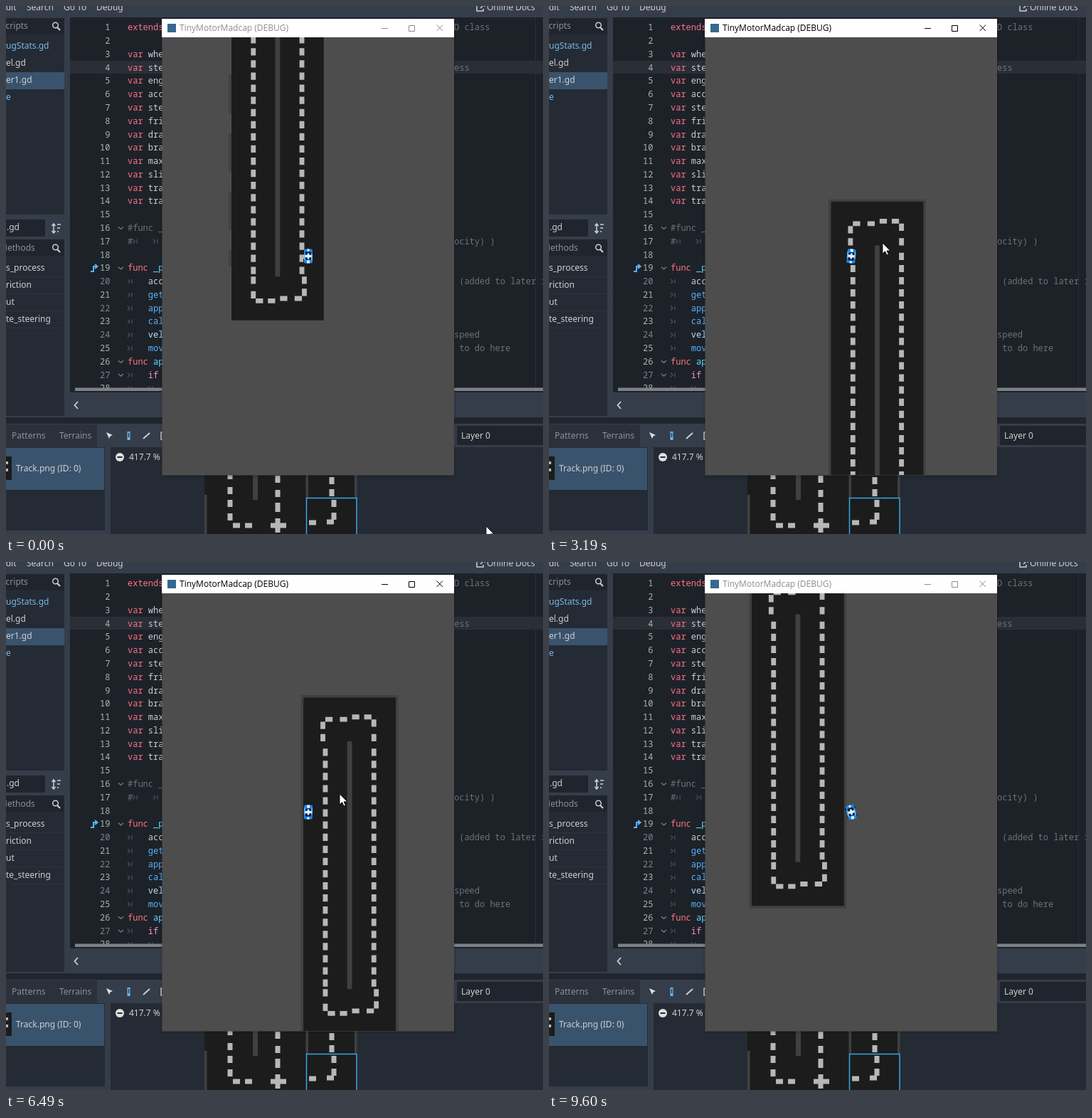
Write an HTML page that moves like this. It is 755 px wide and 742 px high and loops after 9680 ms.

```html
<!DOCTYPE html>
<html lang="en">
<head>
<meta charset="utf-8">
<title>Top-down racer</title>
<style>
  html, body { margin: 0; width: 100%; height: 100%; overflow: hidden; background: #363d4a; }
  svg { display: block; }
  text { white-space: pre; font: 12px "Noto Sans", "Open Sans", sans-serif; fill: #cdcfd2; }
  #code text { font-family: "Noto Sans Mono", "DejaVu Sans Mono", monospace; }
  #chrome text { font-family: "Open Sans", "Noto Sans", sans-serif; fill: inherit; stroke: none; }
  #chrome { fill: #000; stroke: #000; }
  #chrome.idle { fill: #8c8c8c; stroke: #8c8c8c; }
  #chrome path { fill: none; }
  #icons { fill: none; stroke: #cdcfd2; stroke-width: 1.5; }
  #icons .solid { fill: #e0e0e0; stroke: none; }
  .hint text, text.hint { fill: #8b9099; }
  .link { fill: #7ab8ea; }
  .panel { fill: #252b34; }
  .field { fill: #20252d; }
  .pick { fill: #3a536d; }
  .road { fill: #1c1c1c; }
  .kerb { fill: #404040; }
  .dash { fill: none; stroke: #b7b7b7; }
</style>
</head>
<body>
<svg width="755" height="742" viewBox="0 0 755 742">
  <defs>
    <clipPath id="view"><rect x="220" y="44" width="410" height="615"/></clipPath>
    <filter id="shade" x="-5%" y="-5%" width="110%" height="110%">
      <feDropShadow dx="0" dy="1" stdDeviation="2" flood-color="#000" flood-opacity=".3"/>
    </filter>
  </defs>

  <g id="panels">
    <path class="panel" d="M0 17H82V293H0ZM0 328H82V576H0ZM0 620H139V737H0ZM147 620H755V742H147Z"/>
    <path class="field" d="M0 17H82V40H0ZM0 300H55V324H0ZM0 328H82V351H0ZM634 590H755V617H634Z"/>
    <path class="pick" d="M0 93H82V117H0ZM0 621H138V680H0Z"/>
    <path fill="#1d2229" d="M90 16H755V543H90Z"/>
    <path fill="#2a2f37" d="M90 77H755V95H90ZM744 16h1V543h-1Z"/>
    <path fill="#21262e" d="M0 578H755V587H0Z"/>
    <path fill="#2b313b" d="M0 588H128V620H0Z"/>
    <path class="road" d="M0 633H8V666H0Z"/>
    <path class="dash" d="M1.500 640v20" stroke-width="3" stroke-dasharray="4 6"/>
    <path d="M0 380.500H82M0 404.500H82M0 428.500H82M0 452.500H82" stroke="#2d343e"/>
  </g>

  <g id="labels">
    <text x="-7" y="6">Edit</text><text x="29" y="6">Search</text><text x="81" y="6">Go To</text>
    <text x="127" y="6">Debug</text><text x="676" y="6">Online Docs</text>
    <text class="hint" x="-7" y="32">Scripts</text>
    <text class="link" x="0" y="60">ugStats.gd</text><text x="0" y="84">el.gd</text>
    <text x="0" y="108">er1.gd</text><text class="link" x="0" y="132">e</text>
    <text x="1" y="315">.gd</text><text class="hint" x="-9" y="344">Methods</text>
    <text x="0" y="372">s_process</text><text x="0" y="396">riction</text>
    <text x="0" y="420">ut</text><text x="0" y="444">te_steering</text>
    <text class="hint" x="8" y="608">Patterns</text><text class="hint" x="75" y="608">Terrains</text>
    <text x="640" y="608">Layer 0</text><text x="173" y="638">417.7 %</text>
    <text x="14" y="654">Track.png (ID: 0)</text>
  </g>

  <g id="code"></g>
  <path fill="#7d8187" d="M97 536.500H755V541H97Z"/>
  <path fill="#363d4a" d="M90 543H755V578H90Z"/>

  <g id="icons">
    <path d="M664-3H662V7H671V4M667 3L673-3M669-3H673V1"/>
    <g id="lens"><circle cx="69.500" cy="27" r="3.800"/><path d="M72 30L76 34" stroke-width="2.200"/></g>
    <use href="#lens" y="312"/>
    <path d="M67 307V318M64.500 309L67 306 69.500 309M64.500 316L67 319 69.500 316M72 307H77M72 312H76M72 317H74"/>
    <path d="M101 556L96.500 561 101 566" stroke-width="1.800"/>
    <path d="M119 373H123V366H127M125 363L128.500 366 125 369" stroke="#57b3ff" stroke-width="2"/>
    <path class="solid" d="M141 599L150 603 146.500 604.500 145 608Z"/>
    <path d="M172.500 598V610" stroke="#6cb6ef" stroke-width="4"/>
    <path d="M172.500 600V606" stroke="#2b3a4a"/>
    <path d="M193 608L202 600" stroke-width="2"/>
    <path d="M222 599H218V609H222"/>
    <circle class="solid" cx="160" cy="634" r="6"/>
    <path d="M156.500 634H163.500" stroke="#252b34" stroke-width="2"/>
  </g>

  <g id="tilemap">
    <path class="road" d="M279 659H493V742H279Z"/>
    <path class="kerb" d="M279 687h3.500V742h-3.500ZM347 659h7V694h-7ZM421.500 659h3.500V692h-3.500ZM490 659h3.500V691h-3.500Z"/>
    <path class="dash" stroke-width="7" d="M315 655v10m0 11v10m0 8v10m0 9v10M382 660v10m0 10v10m0 8v13
      M382 720v20M372 730h22M458 662v10m0 7v10M461 694v10m0 8v10M319 730h10m7 0h10M451 725h10M426 726h10"/>
    <path d="M422.500 745V691.500H493V745" fill="none" stroke="#35a7e8" stroke-width="1.500"/>
  </g>

  <g id="window">
    <path d="M219.500 18.500H630V659.500H219.500Z" fill="#4d4d4d" filter="url(#shade)"/>
    <path d="M219 18H630V44H219Z" fill="#fff"/>
    <rect x="227" y="25" width="12" height="12" fill="#35698f"/>
    <path id="hover" d="M591 18H630V44H591Z" fill="#e81123"/>
    <g id="chrome">
      <text x="244" y="35">TinyMotorMadcap (DEBUG)</text>
      <path d="M528 31.500H537M566.500 27.500H574.500V35.500H566.500ZM605.500 26.500L614 35M614 26.500L605.500 35"/>
    </g>
    <g clip-path="url(#view)">
      <g id="track">
        <!-- one unit is one pixel of the track art -->
        <g transform="scale(3.4146)">
          <path id="edge" class="kerb" d="M-1-1H39V139H-1Z"/>
          <path id="worn" d="M-.5 37V116" fill="none" stroke="#404040" stroke-dasharray="16 8"/>
          <path class="road" d="M0 0H38V138H0Z"/>
          <path class="kerb" d="M18 18h2V120h-2Z"/>
          <path class="dash" stroke-width="2" stroke-dasharray="3 2" d="M9 21V120M29 21V120"/>
          <path id="bend" class="dash" stroke-width="2"
            d="M8 10v3m0 2v3M9 9h3m3 0h3M20 8h3m2 0h3M29 9v3m0 3v3"/>
          <use href="#bend" transform="rotate(180 19 69)"/>
        </g>
      </g>
      <g id="car">
        <path d="M-7-8H7V-4H-7ZM-7 4H7V8H-7Z" fill="#0b0f16"/>
        <rect x="-6" y="-10" width="12" height="20" rx="2" fill="#1c86ee"/>
        <path d="M-6-3H-4V6H-6ZM4-3H6V6H4Z" fill="#5bb8ff"/>
        <path d="M-4-6H4V-2H-4ZM-4 2H4V5H-4Z" fill="#10182a"/>
        <path d="M-1.500-10H1.500V-7H-1.500ZM-4.500-1.500H4.500V1.500H-4.500ZM-1.300-4H1.300V4H-1.300ZM-2 6H2V10H-2Z" fill="#eaf5ff"/>
      </g>
    </g>
  </g>

  <path id="cursor" d="M0 0V15L3.500 11.700 6 17 8.300 16 6 10.900H10.800Z" fill="#fff" stroke="#000" stroke-width=".8"/>
</svg>

<script>
const LOOP = 9680, FOCUS = 1100, BLUR = 9600;
const $ = id => document.getElementById(id);
const lerp = (a, b, u) => a + (b - a) * u;
const clamp = u => Math.min(1, Math.max(0, u));

function add(parent, tag, attrs, text = "") {
  const el = document.createElementNS("http://www.w3.org/2000/svg", tag);
  for (const k in attrs) el.setAttribute(k, attrs[k]);
  el.textContent = text;
  return parent.appendChild(el);
}

// Code editor: the visible start of each line, coloured by token
const LEFT = 171, CHAR = 7.2, ROW = 18.78;
const vars = "whe ste eng acc ste fri dra bra max sli tra tra".split(" ").map(v => "var " + v);
const listing = ["extends", "", ...vars, "", "#func _", "#\t\t", "", "func _p",
  "\tacc", "\tget", "\tapp", "\tcal", "\tvel", "\tmov", "func ap", "\tif", "\t\t"];
const remarks = { 1: "D class", 4: "ess", 17: "ocity) )", 20: " (added to later i",
  24: "speed", 25: " to do here" };
const NOTE = "#6d7178";
const colours = [
  [/^#/, NOTE], [/^(extends|var|func)$/, "#ff7085"], [/^if$/, "#ff8ccc"],
  [/^(_p|ap)$/, "#66d9ff"], [/^(get|app|cal|mov)$/, "#57b3ff"], [/^vel$/, "#bce0ff"]
];
const colour = word => (colours.find(([re]) => re.test(word)) || [0, "#cdcfd2"])[1];

function codeText(x, y, str, fill, anchor = "start") {
  add($("code"), "text", { x, y, style: `fill:${fill}`, "text-anchor": anchor }, str);
}
function glyph(d, stroke) {
  add($("code"), "path", { d, stroke, fill: "none", "stroke-width": 1.3 });
}

listing.forEach((line, i) => {
  const n = i + 1, y = 34.3 + i * ROW;
  codeText(146.5, y, String(n), /^\t(acc|app|vel|if)/.test(line) ? "#7c828a" : "#a5b8a8", "end");
  if (/^(#?func)/.test(line) || line === "\tif") glyph(`M158 ${y - 5.5}l3.5 3 3.500-3`, "#777c84");
  if (remarks[n]) codeText(630, y, remarks[n], NOTE);
  const words = line[0] === "#" ? [line.trimEnd()] : line.split(/(\s)/);
  let col = 0;
  for (const word of words) {
    if (word.trim()) codeText(LEFT + col * CHAR, y, word, colour(word));
    col += word === "\t" ? 4 : word.length;
  }
  [...line].forEach((ch, k) => {
    const x = LEFT + (ch === line[0] ? k * 4 : k * 4 - 3) * CHAR;
    if (ch === "\t") glyph(`M${x} ${y - 7}l3 3-3 3m6-6v6`, "#4a505a");
  });
});

// The row in which t falls, the row before it, and the share of time passed
function span(rows, t) {
  const i = Math.max(1, rows.findIndex(r => t < r[0]));
  const a = rows[i - 1], b = rows[i];
  return [a, b, clamp((t - a[0]) / (b[0] - a[0]))];
}

const even = u => u, speedUp = u => u * u, slowDown = u => u * (2 - u);

// Legs of the drive: end time, track x, track y, car heading, bulge of a bend, easing
const legs = [
  [1300, 317, -29.5, 0],
  [2290, 278, 191, -10, 0, speedUp],
  [3190, 396.5, 275.5, -175, 110],
  [3750, 420, 50, -185],
  [4420, 317, -5, -360, -97],
  [5200, 308, 240, -365],
  [6100, 417, 327, -530, 92],
  [6750, 419, 100, -545],
  [8060, 274, -33, -734, -130],
  [8950, 285, 12, -734, 0, slowDown],
  [LOOP, 285, 12, -734]
];

function drive(t) {
  const [a, b, time] = span(legs, t);
  const [, x, y, turn, bulge = 0, ease = even] = b;
  const u = ease(time);
  const across = bulge ? (1 - Math.cos(Math.PI * u)) / 2 : u;
  return [lerp(a[1], x, across), lerp(a[2], y, u) + bulge * Math.sin(Math.PI * u), lerp(a[3], turn, u)];
}

// Mouse path: time, x, y
const stops = [
  [40, 675, 731], [180, 744, 655], [540, 484, 349], [FOCUS, 484, 349], [1700, 469, 333],
  [6300, 469, 333], [6490, 469, 326], [7900, 528, 209], [8100, 528, 209],
  [8800, 610, 32], [8990, 650, 575], [9170, 674, 748], [LOOP, 674, 748]
];

function point(t) {
  const [a, b, u] = span(stops, t);
  return [lerp(a[1], b[1], u), lerp(a[2], b[2], u)];
}

function draw(t) {
  const [x, y, turn] = drive(t);
  const fresh = t < FOCUS;
  $("track").setAttribute("transform", `translate(${x} ${y})`);
  $("car").setAttribute("transform", `translate(425 351.5) rotate(${turn})`);
  $("cursor").setAttribute("transform", `translate(${point(t)})`);
  $("chrome").setAttribute("class", fresh || t >= BLUR ? "idle" : "");
  $("hover").setAttribute("opacity", t < 8740 ? 0 : clamp((9150 - t) / 210));
  $("edge").setAttribute("visibility", fresh ? "hidden" : "visible");
  $("worn").setAttribute("visibility", fresh ? "visible" : "hidden");
}

const start = performance.now();
function tick() {
  draw((performance.now() - start) % LOOP);
  requestAnimationFrame(tick);
}
tick();
</script>
</body>
</html>
```
